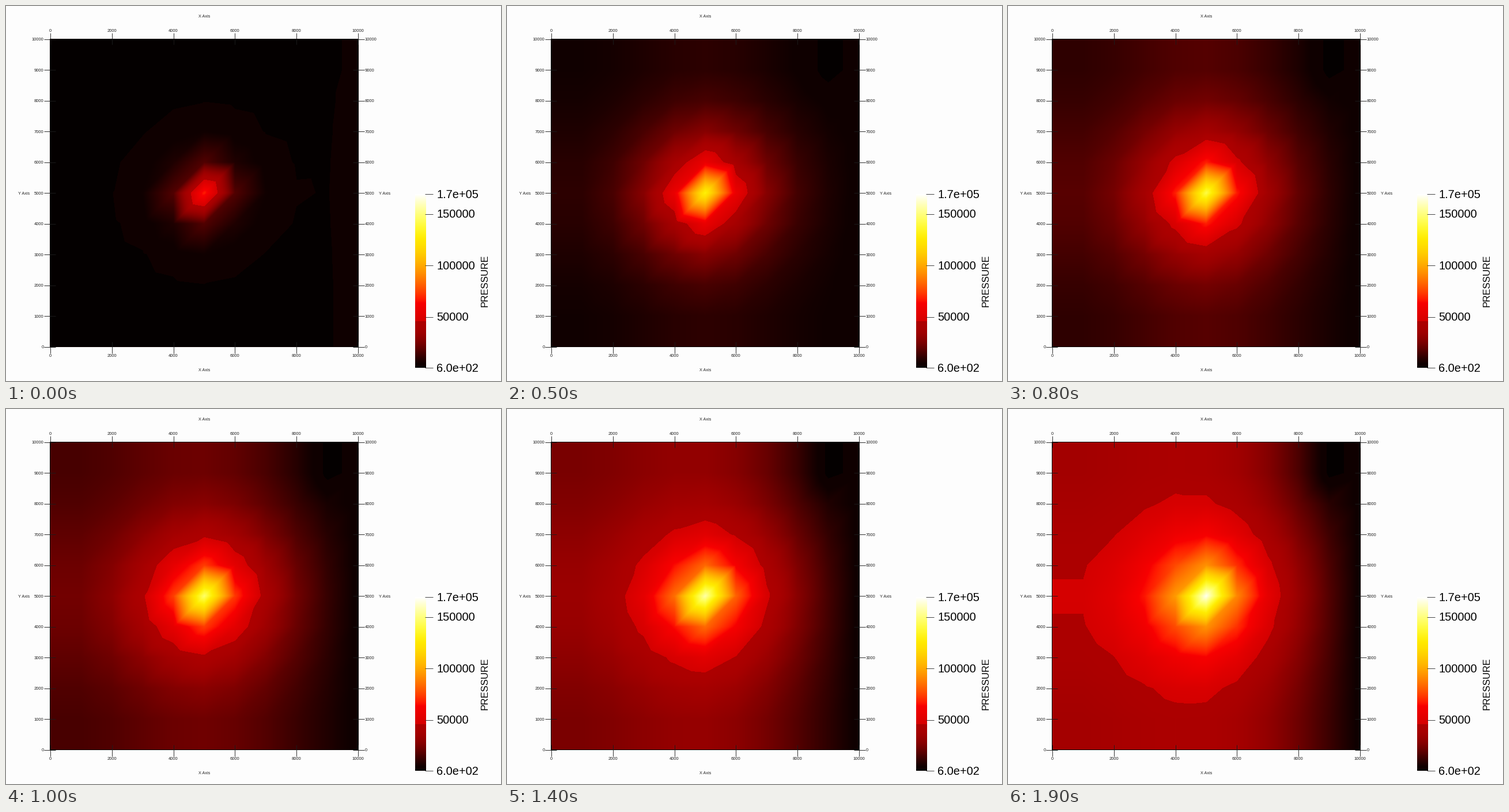
Write a matplotlib script that moves like this. It is 859 by 652 pixels and loops after 2 s.

```python
import numpy as np
import matplotlib.pyplot as plt
from matplotlib.animation import FuncAnimation
from matplotlib.colors import ListedColormap
from matplotlib.patches import Rectangle

W, H, DPI = 859, 652, 64
FRAMES, INTERVAL = 20, 100
LEFT, TOP, SIDE = 77, 58, 534            # plot box in pixels
RIGHT, BOTTOM = LEFT + SIDE, TOP + SIDE + 0.5
P_MIN, P_MAX = 600, 169300
BAR_TOP, BAR_BOTTOM = 327, 629
N = 10                                   # grid cells per side
DIFF, INJECT, EDGE = 0.74, 220e3, 3200   # per-step diffusion, source, right side


def black_body(p):
    """Black, dark red, red, yellow, white, with a hard step inside the reds."""
    def ramp(lo, hi):
        return np.clip((p - lo) / (hi - lo), 0, 1)

    def ease(x, power):
        return np.sin(np.pi / 2 * x) ** power

    step = 45500
    dark = np.where(p < 1800, 4, np.maximum(15, 173 * ease(ramp(P_MIN, step), 1.2)))
    red = np.where(p < step, dark, 212 + 43 * ramp(step, 67000))
    green = 255 * ease(ramp(63500, 150000), 0.85)
    blue = 255 * ramp(125000, P_MAX) ** 1.25
    return np.stack([red, green, blue], axis=1) / 255


CMAP = ListedColormap(black_body(np.linspace(P_MIN, P_MAX, 2048)))


def simulate(steps):
    """Implicit pressure diffusion: closed sides, fixed right edge, one sink."""
    m = N - 1
    size = m * m
    index = lambda i, j: (j - 1) * m + i - 1
    a = np.eye(size)
    gain = np.zeros(size)
    for j in range(1, N):
        for i in range(1, N):
            k = index(i, j)
            for di, dj in ((1, 0), (-1, 0), (0, 1), (0, -1)):
                p, q = i + di, j + dj
                if p == N:
                    a[k, k] += DIFF
                    gain[k] += DIFF * EDGE
                elif p > 0 and 0 < q < N:
                    a[k, k] += DIFF
                    a[k, index(p, q)] -= DIFF
    gain[index(N // 2, N // 2)] += INJECT
    sink = index(N - 1, N - 1)
    a[sink] = 0
    a[sink, sink] = 1
    gain[sink] = 0

    u = np.full(size, float(P_MIN))
    fields = []
    for _ in range(steps):
        u = np.linalg.solve(a, u + gain)
        grid = np.pad(u.reshape(m, m), 1, mode="edge")
        grid[:, -1] = EDGE
        fields.append(grid)
    return fields


# Pixel centres in grid units; row 0 is the top of the plot.
s = (np.arange(SIDE) + 0.5) / SIDE * N
gx, gy = np.meshgrid(s, s[::-1])
ci, cj = gx.astype(int), gy.astype(int)
fx, fy = gx - ci, gy - cj


def surface(u):
    """Linear interpolation on cells split along the rising diagonal."""
    a, b = u[cj, ci], u[cj, ci + 1]
    c, d = u[cj + 1, ci], u[cj + 1, ci + 1]
    low = a + (b - a) * fx + (d - b) * fy
    high = a + (c - a) * fy + (d - c) * fx
    return np.where(fx > fy, low, high)


FIELDS = simulate(FRAMES)

plt.rcParams["font.family"] = "Liberation Sans"
fig = plt.figure(figsize=(W / DPI, H / DPI), dpi=DPI, facecolor="#fdfdfd")
ax = fig.add_axes([0, 0, 1, 1])
ax.axis("off")


def picture(values, x0, x1, y0, y1):
    return ax.imshow(values, cmap=CMAP, vmin=P_MIN, vmax=P_MAX,
                     extent=(x0, x1, y1, y0), aspect="auto",
                     interpolation="nearest", zorder=2)


def px(size):
    return size * 72 / DPI


def line(xs, ys, color="#1c1c1c"):
    ax.plot(xs, ys, color=color, lw=px(0.9), solid_capstyle="butt", zorder=3)


def text(x, y, label, size, ha="center", color="#222222", rotation=0):
    va = "center" if rotation else "center_baseline"
    ax.text(x, y, label, fontsize=px(size), ha=ha, va=va, color=color,
            rotation=rotation, zorder=4)


# Dark frame one pixel around the heat map.
ax.add_patch(Rectangle((LEFT - 1, TOP - 1), SIDE + 2, SIDE + 2, lw=0,
                       facecolor="#080000", antialiased=False, zorder=1))
heat = picture(surface(FIELDS[0]), LEFT, RIGHT, TOP, TOP + SIDE)
bar = np.linspace(P_MAX, P_MIN, BAR_BOTTOM - BAR_TOP)[:, None]
picture(bar, 710, 729, BAR_TOP, BAR_BOTTOM)
ax.set_xlim(0, W)
ax.set_ylim(H, 0)

OUT, IN = 11, 9
for k in range(N + 1):
    label = str(1000 * k)
    y = BOTTOM - (BOTTOM - TOP) * k / N
    line([LEFT - OUT, LEFT + IN], [y, y])
    line([RIGHT - IN, RIGHT + OUT], [y, y])
    text(LEFT - OUT - 0.5, y, label, 7.6, "right")
    text(RIGHT + OUT + 0.5, y, label, 7.6, "left")
    if k % 2 == 0:
        x = LEFT + SIDE * k / N
        line([x, x], [TOP - OUT, TOP + IN])
        line([x, x], [BOTTOM - IN, BOTTOM + OUT])
        text(x, 42.5, label, 7.6)
        text(x, 608, label, 7.6)

for y in (17.5, 632.5):
    text(344, y, "X Axis", 7.2)
for x in (31, 657):
    text(x, 325.5, "Y Axis", 7.2)

for p in (P_MIN, 50000, 100000, 150000, P_MAX):
    y = BAR_BOTTOM - (p - P_MIN) / (P_MAX - P_MIN) * (BAR_BOTTOM - BAR_TOP)
    line([727, 741], [y, y], "#333333")
    label = f"{p:.1e}" if p in (P_MIN, P_MAX) else str(p)
    text(747.5, y - 0.7, label, 20, "left", "#000000")
text(831, 478, "PRESSURE", 16.5, color="#000000", rotation=90)


def draw(n):
    heat.set_data(surface(FIELDS[n]))
    return [heat]


anim = FuncAnimation(fig, draw, frames=FRAMES, interval=INTERVAL,
                     repeat=True, repeat_delay=0, blit=False)
plt.show()
```
